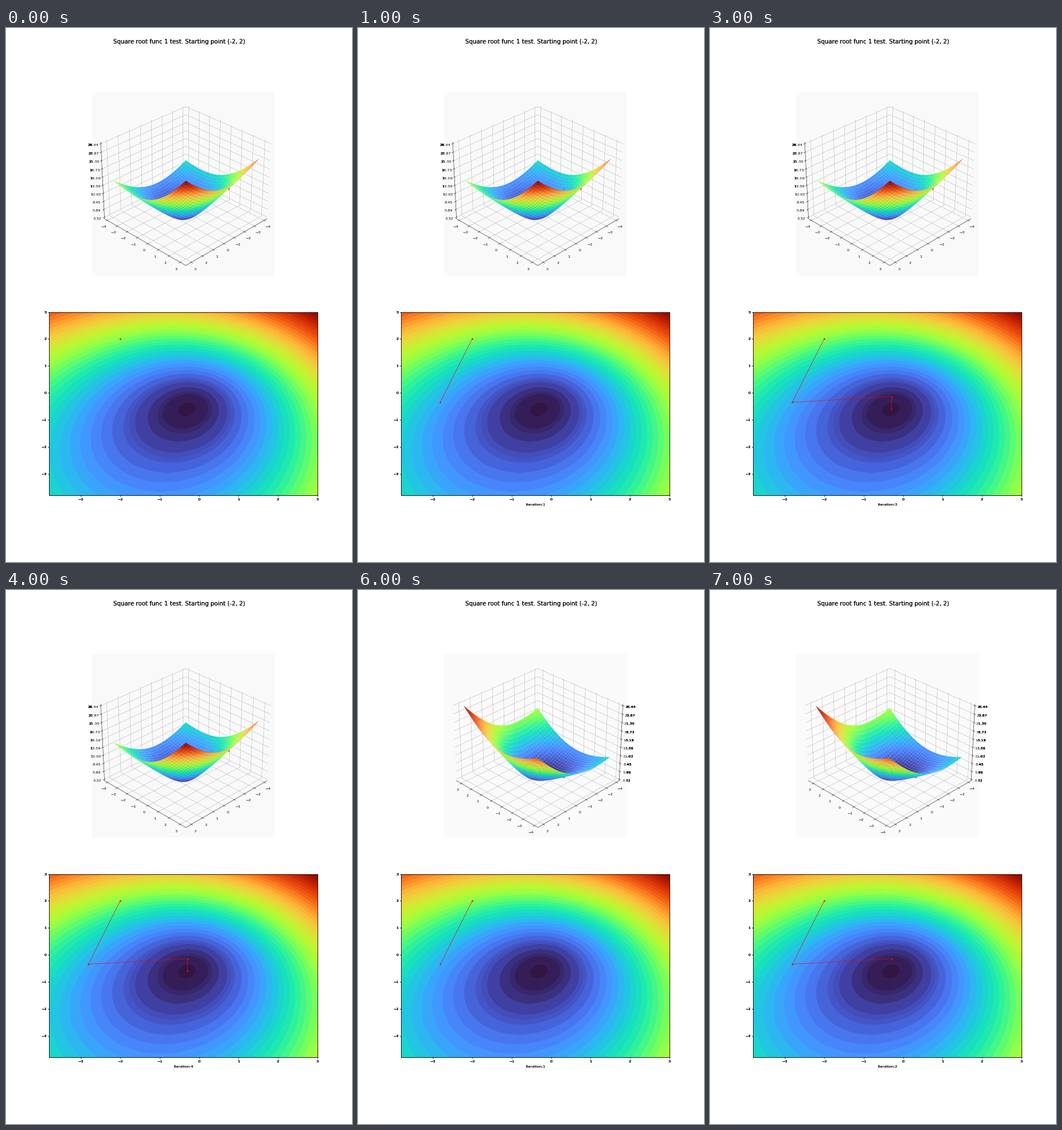
Animation, 603 px wide and 928 px high, one loop 8000 ms. Source, as a matplotlib script:

```python
import numpy as np
import matplotlib.pyplot as plt
from matplotlib.animation import FuncAnimation
from matplotlib.transforms import Bbox, IdentityTransform

W, H, DPI = 603, 928, 46.4
LO, HI = -3.8, 3.0
STEPS = 5  # start point plus four iterations

plt.rcParams["font.family"] = "DejaVu Sans"


def func(x, y):
    return x + 2 * y + 4 * np.sqrt(1 + x**2 + y**2)


def padded(lo, hi, part):
    pad = (hi - lo) * part
    return lo - pad, hi + pad


def overprint(label, times=2, clip=None):
    """Draw a label again on top of itself so that its edges turn darker."""
    x, y = label.get_transform().transform(label.get_position())
    copies = []
    for _ in range(times):
        copy = fig.text(x, y, label.get_text(), transform=IdentityTransform(),
                        ha=label.get_ha(), va=label.get_va(),
                        size=label.get_size())
        if clip is not None:
            copy.set_clip_box(clip)
            copy.set_clip_on(True)
        copies.append(copy)
    return copies


def make_surface(azim, shade):
    ax = fig.add_subplot(211, projection="3d", facecolor=shade)
    ax.view_init(elev=30, azim=azim)
    ax.plot_surface(gx, gy, gz, cmap="turbo", rcount=50, ccount=50)
    side = padded(*padded(LO, HI, 0.05), 1 / 48)
    ax.set(xlim=side, ylim=side, zlim=padded(z_min, z_max, 1 / 48),
           xticks=range(-4, 4), yticks=range(-4, 4),
           zticks=np.linspace(z_min, z_max, 10))
    ax.zaxis.set_major_formatter("{x:.2f}")
    for axis in (ax.xaxis, ax.yaxis, ax.zaxis):
        axis.set_pane_color((1, 1, 1, 0))
    trail, = ax.plot([], [], [], "ro-", lw=1, ms=3)
    return ax, trail


path = np.array([(-2, 2), (-2.81, -0.35), (-0.29, -0.14),
                 (-0.295, -0.59), (-0.3015, -0.603)])
heights = func(path[:, 0], path[:, 1])

grid = np.linspace(LO, HI, 101)
gx, gy = np.meshgrid(grid, grid)
gz = func(gx, gy)
z_min, z_max = np.sqrt(11), func(HI, HI)

# A hair over the size, so that rounding never drops a pixel.
fig = plt.figure(figsize=((W + 0.001) / DPI, (H + 0.001) / DPI), dpi=DPI,
                 facecolor="white")
fig.subplots_adjust(left=0.125, right=0.9, bottom=0.125, top=0.88, hspace=0.2)
title = fig.suptitle("Square root func 1 test. Starting point (-2, 2)",
                     fontsize=16)

views = [make_surface(45, "#f9f9f9"), make_surface(135, "#fafafa")]

flat = fig.add_subplot(212)
fine = np.linspace(LO, HI, 300)
fx, fy = np.meshgrid(fine, fine)
levels = np.r_[3.2, 3.4, 3.8, 4.0, 4.4, 5.0, 5.3, 5.6, np.arange(6.2, 26.7, 0.6)]
flat.contourf(fx, fy, func(fx, fy), levels=levels, cmap="turbo")
flat.set(xlim=(LO, HI), ylim=(LO, HI),
         xticks=range(-3, 4), yticks=range(-3, 4))
flat.tick_params(width=1.4)
flat.spines[:].set_linewidth(1.4)
flat_trail, = flat.plot([], [], "ro-", lw=1, ms=3)

counter = [fig.text(309.2 / W, 1 - 828 / H, "", ha="center", va="center",
                    size=10) for _ in range(2)]

# Label places are known only after a first draw.
fig.canvas.draw()
overprint(title, 1)
for axis in (flat.xaxis, flat.yaxis):
    for tick in axis.majorTicks:
        overprint(tick.label1)

edges = []
for (ax, _), left in zip(views, (True, False)):
    box = ax.bbox
    clip = Bbox([[0, 0], [box.x0, H]]) if left else Bbox([[box.x1, 0], [W, H]])
    edges.append([copy for tick in ax.zaxis.majorTicks
                  for copy in overprint(tick.label1, 3, clip)])


def draw(k):
    view, step = divmod(k, STEPS)
    xs, ys = path[:step + 1].T
    flat_trail.set_data(xs, ys)
    for i, (ax, trail) in enumerate(views):
        ax.set_visible(i == view)
        trail.set_data_3d(xs, ys, heights[:step + 1])
        for copy in edges[i]:
            copy.set_visible(i == view)
    for text in counter:
        text.set_text(f"Iteration:{step}" if step else "")
    return []


anim = FuncAnimation(fig, draw, frames=8, init_func=lambda: draw(0),
                     interval=1000, repeat=True, repeat_delay=0)
plt.show()
```
